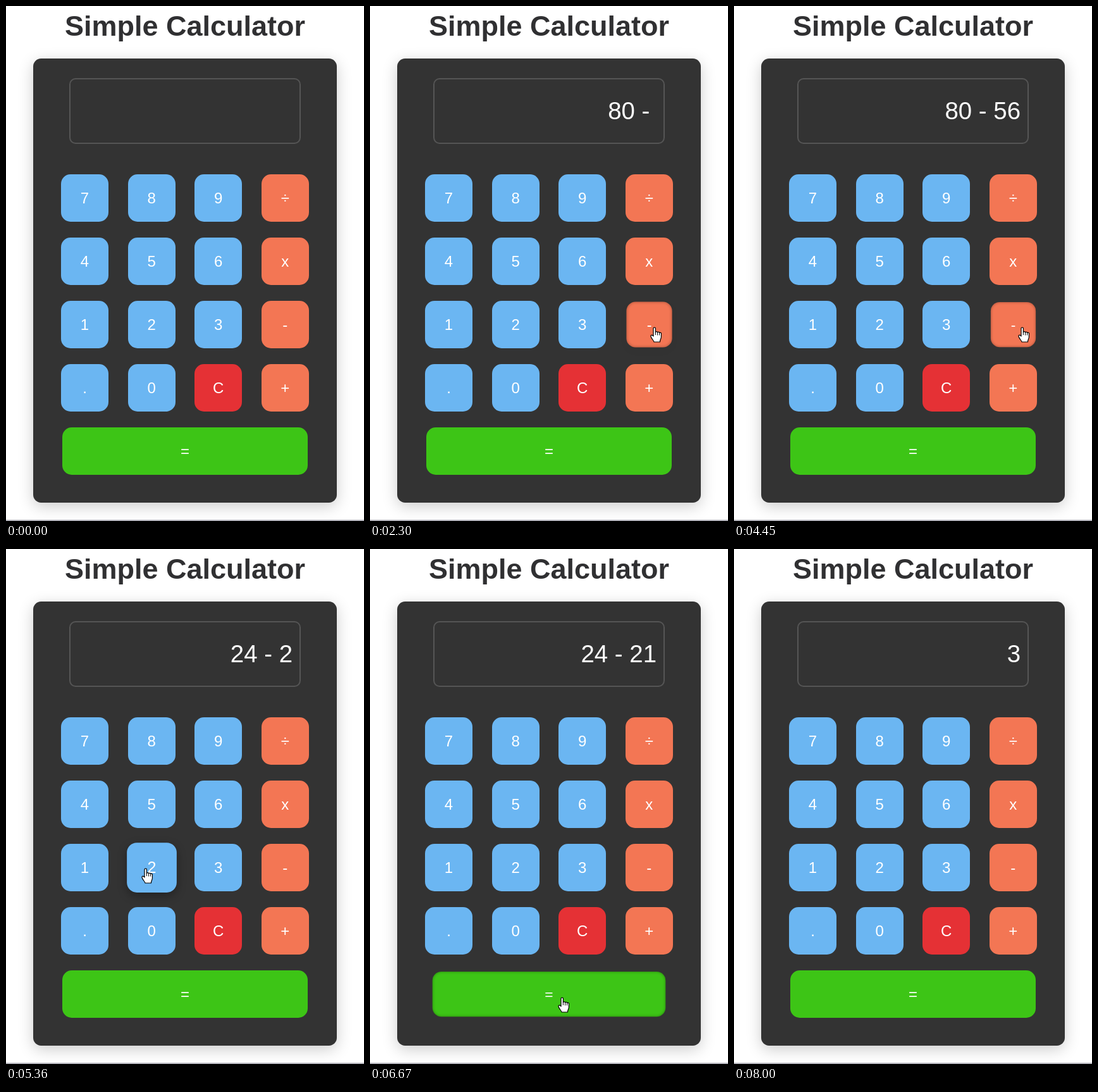
Animation of 566 by 814 pixels, one loop 8030 ms. Source, as an HTML page:

```html
<!DOCTYPE html>
<html lang="en">
<head>
<meta charset="utf-8">
<title>Simple Calculator</title>
<style>
html, body { margin: 0; width: 100%; height: 100%; overflow: hidden; background: #fff; }
body { position: relative; font-family: "Liberation Sans", Arial, sans-serif; }
body > *, .key { position: absolute; box-sizing: border-box; }
h1 { left: 0; top: 0; width: 566px; margin: 0; text-align: center; font-size: 45px; line-height: 63px; color: #303032; white-space: nowrap; }
#panel { left: 43px; top: 83px; width: 480px; height: 702px; border-radius: 12.5px; background: #333; box-shadow: 0 6px 25px rgba(0,0,0,.2); }
#display { left: 100px; top: 114px; width: 366px; height: 104px; border: 2px solid #555; border-radius: 10px; padding-right: 11px; text-align: right; font-size: 38.4px; line-height: 100px; color: #fff; white-space: pre; }
.key { height: 75px; border-radius: 15px; text-align: center; font-size: 24px; line-height: 75px; color: #fff; }
#rule { left: 0; top: 812px; width: 566px; height: 2px; background: #b4b4bc; }
#pointer { left: 0; top: 0; width: 30px; height: 30px; overflow: visible; }
#pointer path { fill: #fff; stroke: #000; stroke-width: 1.2; stroke-linejoin: round; }
#pointer .line { fill: none; stroke-width: 1; }
</style>
</head>
<body>
<h1>Simple Calculator</h1>
<div id="panel"></div>
<div id="display"></div>
<div id="keys"></div>
<div id="rule"></div>
<svg id="pointer">
  <g id="hand">
    <path d="M-2 13V1.7a1.7 1.7 0 0 1 3.4 0V8a1.6 1.6 0 0 1 3.2 .4a1.5 1.5 0 0 1 3 .8a1.4 1.4 0 0 1 2.8 1.2V15c0 3-2 4-2 8H-1c0-2-5-6-5-9.5c0-1.8 2.5-2 4 .5z"/>
    <path class="line" d="M1.4 8v4M4.6 8.5v4M7.6 9.5v3"/>
  </g>
  <path id="arrow" d="M0 0V17l4-4 3 6 2.5-1-3-6H12z"/>
</svg>
<script>
const LOOP = 8030, EASE_MS = 80, PRESS_MS = 150;
const BLUE = '#6bb6f2', ORANGE = '#f37654', RED = '#e53135', GREEN = '#3dc516';

// time of each click and the text it leaves on the display
const clicks = [
  [790, '8'], [1560, '80'], [2300, '80 - '], [3050, '80 - 5'], [3790, '80 - 56'],
  [4510, '24 - '], [5260, '24 - 2'], [6000, '24 - 21'], [6730, '3']
];

// pointer stops: time, x, y
const stops = [
  [30, 262, 17], [560, 233, 310], [1000, 232, 310], [1520, 232, 604],
  [1640, 232, 604], [2130, 450, 508], [2360, 450, 508], [2850, 232, 411],
  [3300, 232, 411], [3640, 338, 411], [3860, 338, 411], [4300, 456, 508],
  [4570, 456, 508], [5060, 221, 505], [5390, 221, 505], [5800, 122, 510],
  [6070, 122, 510], [6520, 304, 709], [6850, 304, 709], [7420, 260, -30]
];

const get = id => document.getElementById(id);
const display = get('display'), pointer = get('pointer'), hand = get('hand'), arrow = get('arrow');
const keys = [];

function addKey(label, x, y, w, color) {
  const el = document.createElement('div');
  el.className = 'key';
  el.textContent = label;
  Object.assign(el.style, { left: x + 'px', top: y + 'px', width: w + 'px', background: color });
  get('keys').append(el);
  keys.push({ el, x, y, w });
}

[...'789÷456x123-.0C+'].forEach((label, i) => {
  const color = label === 'C' ? RED : i % 4 === 3 ? ORANGE : BLUE;
  addKey(label, 87 + 105.6 * (i % 4), 266 + 100 * Math.floor(i / 4), 75, color);
});
addKey('=', 89, 666, 388, GREEN);

function pointerAt(t) {
  const i = stops.findIndex(s => s[0] > t);
  if (i < 1) return null;
  const [t0, x0, y0] = stops[i - 1], [t1, x1, y1] = stops[i];
  const u = (t - t0) / (t1 - t0), e = u * u * (3 - 2 * u);
  return { x: x0 + (x1 - x0) * e, y: y0 + (y1 - y0) * e };
}

const isOver = (k, p) => p && p.x >= k.x && p.x <= k.x + k.w && p.y >= k.y && p.y <= k.y + 75;
const isPressed = t => clicks.some(([c]) => t >= c - PRESS_MS && t < c);

// hover and press levels, averaged over the transition time
function levels(key, past) {
  let hover = 0, press = 0;
  for (const s of past) {
    if (!isOver(key, s.p)) continue;
    if (s.down) press++; else hover++;
  }
  return [hover / past.length, press / past.length];
}

function draw(t) {
  const p = pointerAt(t);
  const past = Array.from({ length: 8 }, (_, i) => {
    const at = t - i * EASE_MS / 8;
    return { p: pointerAt(at), down: isPressed(at) };
  });
  for (const k of keys) {
    const [hover, press] = levels(k, past);
    k.el.style.transform = hover || press ? `scale(${1 + .05 * (hover - press)})` : 'none';
    k.el.style.boxShadow =
      `0 5px 14px rgba(0,0,0,${.32 * hover}), inset 0 0 5px rgba(0,0,0,${.38 * press})`;
  }
  const text = clicks.reduce((last, [c, s]) => t >= c ? s : last, '').trimEnd();
  const shown = /-$/.test(text) ? text + ' ' : text;
  if (display.textContent !== shown) display.textContent = shown;

  pointer.style.display = p ? 'block' : 'none';
  if (p) {
    const over = keys.some(k => isOver(k, p));
    hand.style.display = over ? '' : 'none';
    arrow.style.display = over ? 'none' : '';
    pointer.style.transform = `translate(${Math.round(p.x)}px, ${Math.round(p.y)}px)`;
  }
}

const start = performance.now();
function tick() {
  draw((performance.now() - start) % LOOP);
  requestAnimationFrame(tick);
}
tick();
</script>
</body>
</html>
```
